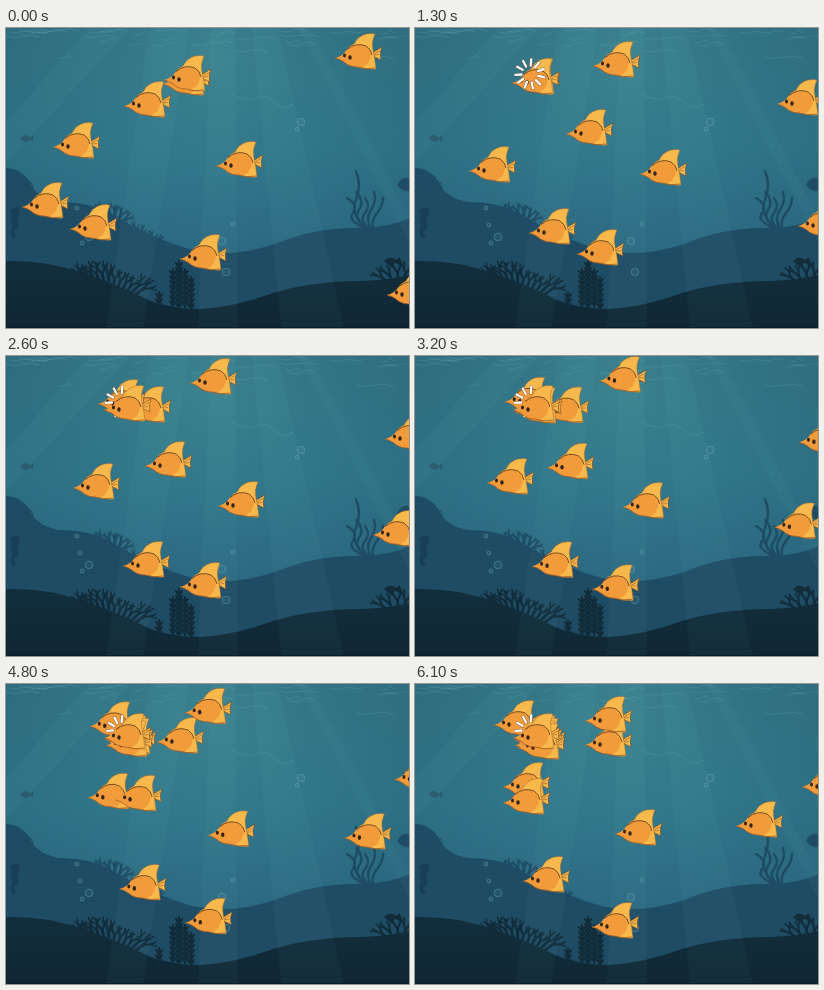
Recreate the animation shown at these times as an HTML page. Size 403x300 px, loop 6.2 s.

```html
<!DOCTYPE html>
<html>
<head>
<meta charset="utf-8">
<style>
html, body { margin: 0; width: 100%; height: 100%; overflow: hidden; background: #2c6b80; }
svg { display: block; width: 100vw; height: 100vh; }
</style>
</head>
<body>
<svg viewBox="0 0 403 300" preserveAspectRatio="none">
  <defs>
    <linearGradient id="water" x1="0" y1="0" x2="0" y2="1">
      <stop offset="0" stop-color="#2f7080"/>
      <stop offset=".4" stop-color="#2f7488"/>
      <stop offset=".75" stop-color="#2c6a84"/>
    </linearGradient>
    <radialGradient id="glow" gradientUnits="userSpaceOnUse" cx="205" cy="30" r="230">
      <stop offset="0" stop-color="#48919a" stop-opacity=".55"/>
      <stop offset=".5" stop-color="#3b8294" stop-opacity=".25"/>
      <stop offset="1" stop-color="#235a70" stop-opacity=".2"/>
    </radialGradient>
    <linearGradient id="depth" x1="0" y1="0" x2="0" y2="1">
      <stop offset="0" stop-color="#122e3d"/>
      <stop offset="1" stop-color="#102733"/>
    </linearGradient>
    <g id="fish" stroke-linejoin="round">
      <path d="M37 20L47 14Q44 20 46 27L38 23Z" fill="#f6b84c" stroke="#7c4a22" stroke-width=".6"/>
      <path d="M39 21L45 17.500M39 22L44 21.500" stroke="#a9662a" stroke-width=".7"/>
      <path d="M11 18Q14 13 19 11Q23 3 31 1Q37 0 40 1Q36 9 38 17Q40 26 41 36Q30 37 20 33Z" fill="#f7b94b" stroke="#a5672c" stroke-width=".5"/>
      <path d="M0 25Q7 23 10 19Q16 11 25 12Q35 13 36 22Q35 31 28 34Q15 35 9 29Q5 26 0 25Z" fill="#f29b3b"/>
      <path d="M12 16.500Q21 9 31 13Q36 16 37 22" fill="none" stroke="#69401f" stroke-width=".9"/>
      <path d="M0 25Q5 26 9 29Q14 34 22 34Q31 37 40 35" fill="none" stroke="#a85f26" stroke-width=".8"/>
      <ellipse cx="9.500" cy="22.500" rx="1.500" ry="2" fill="#33241c"/>
      <ellipse cx="15" cy="24.500" rx="1.700" ry="2.300" fill="#33241c"/>
    </g>
  </defs>
  <rect width="403" height="300" fill="url(#water)"/>
  <rect width="403" height="300" fill="url(#glow)"/>
  <g id="ripples" fill="none" stroke="#69aeb4" stroke-width=".8" stroke-opacity=".3">
    <path d="M225 65q12 9 25 5t20 5t18 1"/>
  </g>
  <g id="far" fill="#1f4c65" stroke="#1f4c65" stroke-linecap="round">
    <path stroke="none" d="M0 140Q15 140 24 155Q30 169 52 174Q86 174 107 187Q147 211 186 222Q226 231 272 215Q305 201 345 200Q385 200 403 190V300H0Z"/>
    <path stroke="none" d="M14 110Q19 104 24 110L27 107V114L24 111Q19 117 14 110Z" fill="#28586b"/>
    <path stroke="none" d="M391 157Q397 147 403 151V163Q396 164 391 157Z"/>
  </g>
  <path d="M8 180Q14 177 14 185Q11 188 12 194Q14 201 8 203Q8 209 12 207Q8 213 5 207Q3 202 7 197Q3 191 6 186L3 183Z" fill="#193f58"/>
  <g id="near" fill="#122c3a" stroke="#122c3a" stroke-linecap="round">
    <path stroke="none" fill="url(#depth)" d="M0 233Q42 232 76 245Q112 256 140 271Q164 281 195 281Q229 279 267 265Q306 253 355 253Q383 252 403 247V300H0Z"/>
    <path stroke="none" d="M378 233Q384 227 390 232L394 229V237L389 235Q384 240 378 233Z"/>
  </g>
  <path fill="#8fd0d0" fill-opacity=".035" d="M143 0H183L137 300H100ZM205 0H229L232 300H192ZM246 0H272L338 300H275ZM292 0H305L403 190V215ZM82 0H125L0 135V95Z"/>
  <g id="bubbles" fill="#77b4bd" fill-opacity=".08" stroke="#76b6be" stroke-width=".8" stroke-opacity=".5"/>
  <rect y="299" width="403" height="1" fill="#0b1b28"/>
  <g id="school"/>
</svg>
<script>
const NS = "http://www.w3.org/2000/svg";
const LOOP = 6200, STEP = 100;
const get = id => document.getElementById(id);
const ripples = get("ripples"), far = get("far"), near = get("near"), school = get("school");

function add(parent, tag, attrs) {
  const el = document.createElementNS(NS, tag);
  for (const k in attrs) el.setAttribute(k, attrs[k]);
  parent.appendChild(el);
  return el;
}

let seed = 17;
const rand = () => (seed = (seed * 16807) % 2147483647) / 2147483647;

// Scenery
for (let i = 0; i < 34; i++) {
  const x = rand() * 390, y = 2 + rand() * rand() * 32, w = 12 + rand() * 28;
  add(ripples, "path", { d: `M${x} ${y}q${w / 4} ${2 + rand() * 2} ${w / 2} 0t${w / 2} 1` });
}

function twig(parent, x, y, angle, len, depth) {
  const x2 = x + Math.cos(angle) * len, y2 = y + Math.sin(angle) * len;
  add(parent, "path", { d: `M${x} ${y}L${x2} ${y2}`, "stroke-width": 1.5 + depth * 0.7 });
  if (!depth) return;
  for (const side of [-1, 1])
    twig(parent, x2, y2, angle + side * (0.25 + rand() * 0.3), len * 0.8, depth - 1);
}

// Twigs fan out along the line from (x1, y1) to (x2, y2).
function coral(parent, x1, y1, x2, y2, count, len) {
  for (let i = 0; i < count; i++) {
    const k = i / (count - 1);
    twig(parent, x1 + (x2 - x1) * k, y1 + (y2 - y1) * k, -2.4 + 1.8 * k, len * (0.8 + rand() * 0.4), 2);
  }
}
coral(far, 0, 150, 16, 162, 5, 5);
coral(far, 102, 188, 115, 194, 5, 6);
coral(far, 130, 208, 143, 221, 6, 7);
coral(near, 80, 250, 130, 266, 12, 8);
coral(near, 382, 255, 408, 252, 6, 8);

function weed(x, h, lean) {
  add(far, "path", {
    d: `M${365 + x / 4} 200q${x / 2 - 6} ${-h / 4} ${x / 2} ${-h / 2}t${lean} ${-h / 2}`,
    fill: "none", "stroke-width": 2.4
  });
}
weed(-20, 57, 0);
for (let i = 0; i < 5; i++) weed(i * 8 - 24, 30 + i % 2 * 6, i * 3 - 6);

function spire(x, top) {
  add(near, "path", { d: `M${x} 281V${top}`, "stroke-width": 2 });
  for (let y = top + 5; y < 281; y += 5)
    add(near, "path", { d: `M${x - 3} ${y - 3}L${x} ${y + 2}L${x + 3} ${y - 3}`, "stroke-width": 2 });
}
spire(153, 264);
for (let i = 0; i < 4; i++) spire(167 + i * 6, 233 + Math.abs(i - 1) * 8);

function bubble(x, y, r) {
  add(get("bubbles"), "circle", { cx: x, cy: y, r });
}
for (const [x, y] of [[83, 209], [295, 94], [220, 244], [216, 213]]) bubble(x, y, 3.8);
for (const [x, y] of [[71, 180], [74, 197], [76, 215], [291, 101], [227, 196]]) bubble(x, y, 1.9);

// Motion: each fish glides smoothly through four waypoints.
const TIMES = [0, 1300, 2600, 6100];
const LAST = TIMES.length - 1;

function glide(v, t) {
  const span = j => TIMES[j + 1] - TIMES[j];
  const rate = j => (v[j + 1] - v[j]) / span(j);
  const inner = j => (rate(j - 1) * span(j) + rate(j) * span(j - 1)) / (span(j - 1) + span(j));
  const slope = j => j === 0 ? 1.5 * rate(0) - inner(1) / 2
    : j === LAST ? 1.5 * rate(LAST - 1) - inner(LAST - 1) / 2 : inner(j);
  let i = 0;
  while (i < LAST - 1 && t >= TIMES[i + 1]) i++;
  const h = span(i), u = (t - TIMES[i]) / h, w = 1 - u, r = rate(i);
  return v[i] + (v[i + 1] - v[i]) * u + h * u * w * ((slope(i) - r) * w - (slope(i + 1) - r) * u);
}

const swimmers = [];
function swim(...points) {
  swimmers.push({
    el: add(school, "use", { href: "#fish" }),
    xs: points.map(p => p[0]),
    ys: points.map(p => p[1])
  });
}
swim([157, 31], [98, 30], [118, 30], [170, 36]);
swim([158, 27], [178, 13], [184, 2], [170, 12]);
swim([329, 5], [362, 51], [379, 58], [387, 78]);
swim([47, 94], [97, 30], [92, 23], [79, 16]);
swim([16, 154], [54, 118], [67, 107], [88, 78]);
swim([118, 53], [151, 81], [139, 85], [88, 94]);
swim([210, 113], [225, 121], [212, 125], [200, 125]);
swim([64, 176], [114, 180], [117, 185], [108, 172]);
swim([174, 206], [162, 201], [174, 206], [177, 218]);
swim([381, 242], [383, 173], [367, 154], [321, 117]);

// Fish gather under the leader one after another.
const pile = [0, 1, 2, 3].map(i => ({
  start: 3000 + i * 800,
  el: add(school, "use", { href: "#fish", x: 100 + i % 2 * 3, y: 31 + i * 2.7 })
}));
const burst = add(school, "g", { "stroke-linecap": "round" });
const RAYS = 11;
const edge = add(burst, "path", { stroke: "#694329", "stroke-width": 3 });
const core = add(burst, "path", { stroke: "#fff", "stroke-width": 2.3 });
const leader = add(school, "use", { href: "#fish", x: 98, y: 29 });

const show = (el, on) => el.setAttribute("visibility", on ? "visible" : "hidden");

function draw(t) {
  for (const s of swimmers) {
    s.el.setAttribute("x", glide(s.xs, t).toFixed(2));
    s.el.setAttribute("y", glide(s.ys, t).toFixed(2));
  }
  for (const p of pile) show(p.el, t >= p.start);
  show(leader, t >= 1500);
  show(burst, t >= 1100);

  // Every third second the burst flashes in front of the leader.
  const flash = (t + 1900) % 2900 < 500;
  school.append(...(flash ? [leader, burst] : [burst, leader]));

  const grow = (t % 600) / 600;
  let d = "";
  for (let i = 0; i < RAYS; i++) {
    const a = (i + 0.4) / RAYS * 2 * Math.PI, c = Math.cos(a), s = Math.sin(a);
    const r1 = 8 + grow * 3, r2 = 14 + grow * 4;
    d += `M${115 + c * r1} ${46 + s * r1}L${115 + c * r2} ${46 + s * r2}`;
  }
  edge.setAttribute("d", d);
  core.setAttribute("d", d);
}

const begin = performance.now();
function tick() {
  const t = (performance.now() - begin) % LOOP;
  draw(Math.floor(t / STEP) * STEP);
  requestAnimationFrame(tick);
}
draw(0);
requestAnimationFrame(tick);
</script>
</body>
</html>
```
